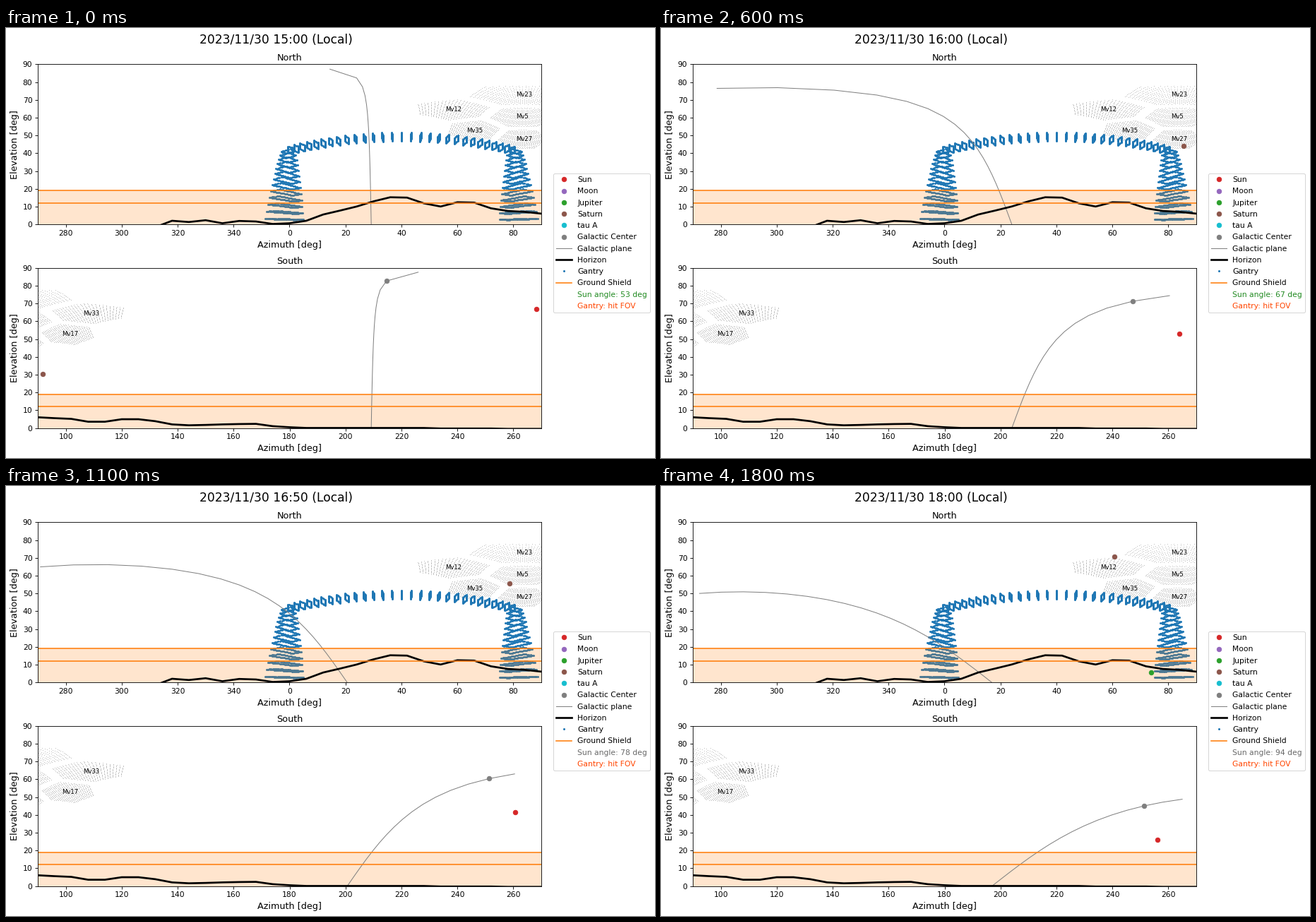
Write a matplotlib script that moves like this. It is 919 px wide and 609 px high and loops after 1900 ms.

```python
import numpy as np
import matplotlib.pyplot as plt
from matplotlib.animation import FuncAnimation
from matplotlib.lines import Line2D

W, H = 919, 609
FRAMES, INTERVAL = 19, 100
LAT, LON = np.radians(-22.96), -67.79
START = 8734.25                # days since J2000 at 15:00 local
BORE_AZ, BORE_EL = 83.2, 60.0  # telescope pointing
SUN_LIMIT = 70
SHIELD_LOW, SHIELD_HIGH = 12, 19

plt.rcParams.update({
    "font.family": "DejaVu Sans", "font.size": 10.7,
    "axes.titlesize": 12.8, "axes.labelsize": 12.8,
    "axes.titlepad": 5.6, "axes.labelpad": 4.3, "axes.linewidth": 0.86,
    "xtick.major.size": 3.75, "ytick.major.size": 3.75,
    "xtick.major.pad": 3.75, "ytick.major.pad": 3.75,
    "xtick.major.width": 0.86, "ytick.major.width": 0.86,
})

# ---------- sky ----------


def alt_az(ra, dec, lst):
    """Azimuth and elevation in degrees from equatorial degrees."""
    ha, dec = np.radians(lst - ra), np.radians(dec)
    up = np.sin(LAT) * np.sin(dec) + np.cos(LAT) * np.cos(dec) * np.cos(ha)
    north = np.cos(LAT) * np.sin(dec) - np.sin(LAT) * np.cos(dec) * np.cos(ha)
    east = -np.cos(dec) * np.sin(ha)
    return np.degrees(np.arctan2(east, north)) % 360, np.degrees(np.arcsin(up))


def sun_position(day):
    g = np.radians(357.528 + 0.9856003 * day)
    lam = np.radians(280.460 + 0.9856474 * day
                     + 1.915 * np.sin(g) + 0.020 * np.sin(2 * g))
    tilt = np.radians(23.436)
    ra = np.arctan2(np.cos(tilt) * np.sin(lam), np.cos(lam))
    return np.degrees(ra), np.degrees(np.arcsin(np.sin(tilt) * np.sin(lam)))


def galactic_plane(lon):
    """Equatorial coordinates of the plane, pole taken at the date."""
    pole_ra, pole_dec, node = 193.15, np.radians(27.0), np.radians(122.9)
    t = node - np.radians(lon)
    dec = np.arcsin(np.cos(pole_dec) * np.cos(t))
    ra = np.arctan2(np.sin(t), -np.sin(pole_dec) * np.cos(t))
    return np.degrees(ra) + pole_ra, np.degrees(dec)


def separation(az1, el1, az2, el2):
    az1, el1, az2, el2 = np.radians([az1, el1, az2, el2])
    c = np.sin(el1) * np.sin(el2) + np.cos(el1) * np.cos(el2) * np.cos(az1 - az2)
    return np.degrees(np.arccos(c))


def to_north(az):
    return (np.asarray(az) + 90) % 360 - 90


def to_south(az):
    return np.asarray(az) % 360


# ---------- static geometry ----------


def outline(corners, step=0.017):
    """Dots along a closed polygon in space."""
    parts = []
    for a, b in zip(corners, np.roll(corners, -1, axis=0)):
        n = max(2, int(np.ceil(np.linalg.norm(b - a) / step)))
        parts.append(a + (b - a) * np.linspace(0, 1, n, endpoint=False)[:, None])
    return np.vstack(parts)


def gantry():
    """Azimuth and elevation of the crane: a beam on two splayed legs."""
    rings = []
    for k in range(-14, 15):
        x = 0.0592 * k
        rings.append(outline(np.array([
            (x, 0.97, 1.097), (x, 0.97, 1.228),
            (x, 1.03, 1.228), (x, 1.03, 1.097)])))
    for side in (-1, 1):
        for z in 0.07 + 0.09 * np.arange(13):
            f = z / 1.15
            c, b = 0.88 - 0.025 * f, 0.193 - 0.163 * f
            rings.append(outline(np.array([
                (side * (c - 0.05), 1 - b, z), (side * (c + 0.05), 1 - b, z),
                (side * (c + 0.05), 1 + b, z), (side * (c - 0.05), 1 + b, z)])))
    x, y, z = np.vstack(rings).T
    return 40 + np.degrees(np.arctan2(x, y)), np.degrees(np.arctan2(z, np.hypot(x, y)))


def from_focal_plane(xi, eta):
    a, b = np.sin(np.radians(xi)), np.sin(np.radians(eta))
    c = np.sqrt(1 - a**2 - b**2)
    t = np.radians(BORE_EL)
    az = BORE_AZ + np.degrees(np.arctan2(a, c * np.cos(t) - b * np.sin(t)))
    return az, np.degrees(np.arcsin(c * np.sin(t) + b * np.cos(t)))


def hexagon(rings=11, radius=5.8):
    s = radius / rings
    pts = [(s * (q + r / 2), s * r * np.sqrt(3) / 2)
           for q in range(-rings, rings + 1) for r in range(-rings, rings + 1)
           if abs(q + r) <= rings]
    return np.array(pts).T


MODULES = {"Mv5": None, "Mv23": 90, "Mv12": 150, "Mv35": 210,
           "Mv27": 270, "Mv17": 330, "Mv33": 30}
PITCH = 12.35

# horizon every 6 degrees, from azimuth -90 to 270
HORIZON_AZ = np.arange(-90, 271, 6)
HORIZON_EL = [-3] * 7 + [
    -1.5, 2.1, 1.4, 2.4, 0.7, 2.0, 1.7, 0.3, 0.7, 2.1, 5.6, 7.8, 10.1, 13.0,
    15.3, 15.1, 11.9, 10.1, 12.5, 12.3, 9.1, 7.6, 7.1, 6.1, 5.6, 5.2, 3.6, 3.6,
    5.0, 5.0, 3.9, 2.1, 1.6, 1.8, 2.1, 2.3, 2.4, 1.1, 0.5,
] + [0.1] * 8 + [-0.2] * 4 + [-0.4] * 3

# ---------- figure ----------

fig = plt.figure(figsize=(W / 72, H / 72), dpi=72, facecolor="white")
title = fig.text(382.5 / W, 1 - 22 / H, "", fontsize=17.1, ha="center")

BODIES = {"Sun": "tab:red", "Moon": "tab:purple", "Jupiter": "tab:green",
          "Saturn": "tab:brown", "tau A": "tab:cyan", "Galactic Center": "tab:gray"}
FIXED = {"Moon": (107, 27.5), "Jupiter": (35.0, 12.6),
         "Saturn": (333.8, -12.7), "tau A": (83.98, 22.02)}
DOT = dict(marker="o", ls="none", ms=6.4)
PLANE = dict(color="tab:gray", lw=1.0)
RIDGE = dict(color="black", lw=2.7)
CRANE = dict(color="tab:blue", marker=".", ls="none", ms=6, mew=0)
SHIELD = dict(color="tab:orange", lw=1.6)


def make_panel(name, top, lo, wrap):
    ax = fig.add_axes([45 / W, 1 - (top + 227) / H, 713 / W, 227 / H])
    ax.set(xlim=(lo, lo + 180), ylim=(0, 90), title=name)
    ax.set_xlabel("Azimuth [deg]", labelpad=5.2)
    ax.set_ylabel("Elevation [deg]")
    ticks = np.arange(lo + 10, lo + 180, 20)
    ax.set_xticks(ticks, [str(t % 360) for t in ticks])
    ax.set_yticks(range(0, 91, 10))

    hx, hy = hexagon()
    for label, angle in MODULES.items():
        r = 0 if angle is None else PITCH
        t = np.radians(angle or 0)
        cx, cy = r * np.cos(t), r * np.sin(t)
        az, el = from_focal_plane(cx + hx, cy + hy)
        ax.plot(wrap(az), el, ",", color="#c2c2c2", zorder=0.8)
        az, el = from_focal_plane(cx, cy)
        if lo <= az - 2.25 < lo + 180:
            ax.text(az - 2.25, el - 0.6, label, fontsize=8.5)

    az, el = gantry()
    ax.plot(wrap(az), el, zorder=0.9, **CRANE)
    ax.axhspan(0, SHIELD_HIGH, color="tab:orange", alpha=0.2, lw=0, zorder=1)
    plane, = ax.plot([], [], **PLANE)
    ax.plot(HORIZON_AZ, HORIZON_EL, **RIDGE)
    for level in (SHIELD_LOW, SHIELD_HIGH):
        ax.axhline(level, **SHIELD)
    dots = {b: ax.plot([], [], color=c, **DOT)[0] for b, c in BODIES.items()}
    return lo, wrap, plane, dots


panels = [make_panel("North", 51.3, -90, to_north),
          make_panel("South", 339.7, 90, to_south)]

handles = [Line2D([], [], color=c, label=b, **DOT) for b, c in BODIES.items()]
handles += [Line2D([], [], label="Galactic plane", **PLANE),
            Line2D([], [], label="Horizon", **RIDGE),
            Line2D([], [], label="Gantry", **CRANE),
            Line2D([], [], label="Ground Shield", **SHIELD),
            Line2D([], [], ls="none", label="Sun angle: 53 deg"),
            Line2D([], [], ls="none", label="Gantry: hit FOV")]
legend = fig.legend(handles=handles, loc="center left", borderaxespad=0,
                    labelspacing=0.585, bbox_to_anchor=(775 / W, 0.5))
angle_text, hit_text = legend.get_texts()[-2:]
hit_text.set_color("orangered")

LONGITUDES = np.arange(-180, 181, 5)


def update(i):
    minutes = 15 * 60 + 10 * i
    title.set_text(f"2023/11/30 {minutes // 60}:{minutes % 60:02d} (Local)")

    day = START + i / 144
    lst = 280.46062 + 360.98564737 * day + LON
    places = {b: alt_az(*pos, lst) for b, pos in FIXED.items()}
    places["Sun"] = alt_az(*sun_position(day), lst)
    places["Galactic Center"] = alt_az(*galactic_plane(0), lst)
    plane_az, plane_el = alt_az(*galactic_plane(LONGITUDES), lst)

    for lo, wrap, plane, dots in panels:
        x = wrap(plane_az)
        inside = (x >= lo) & (x <= lo + 180)
        plane.set_data(np.where(inside, x, np.nan), plane_el)
        for body, (az, el) in places.items():
            dots[body].set_data([wrap(az)], [el])

    angle = separation(*places["Sun"], BORE_AZ, BORE_EL)
    angle_text.set_text(f"Sun angle: {angle:.0f} deg")
    angle_text.set_color("forestgreen" if angle < SUN_LIMIT else "dimgray")
    return []


anim = FuncAnimation(fig, update, frames=FRAMES, interval=INTERVAL,
                     init_func=lambda: update(0), repeat=True, blit=False)
plt.show()
```
